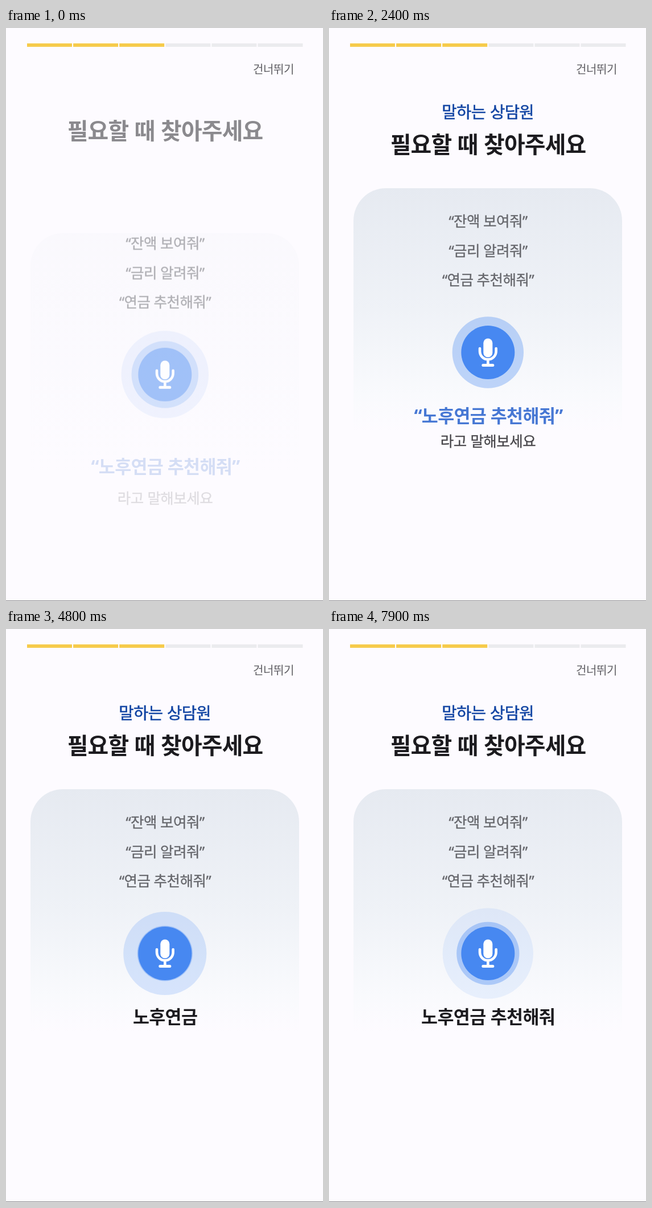
An HTML page that plays this animation: 557 px wide and 1005 px high, repeating every 8000 ms.

```html
<!DOCTYPE html>
<html lang="ko">
<head>
<meta charset="utf-8">
<style>
  html, body { margin: 0; width: 100%; height: 100%; overflow: hidden; background: #fdfbff; }
  svg { display: block; width: 100%; height: 100%; }
  text {
    font-family: "Noto Sans CJK KR", "Noto Sans CJK", sans-serif;
    letter-spacing: -.02em;
    text-anchor: middle;
    color: #1c1b1f;
    fill: currentColor;
  }
  .title { font-size: 39.9px; font-weight: 700; }
  .sub { font-size: 28.6px; font-weight: 500; color: #1245a3; stroke: currentColor; stroke-width: .6px; }
  .skip { font-size: 20px; color: #605f64; }
  .line { font-size: 25.5px; stroke: currentColor; stroke-width: .35px; }
  .phrase { font-size: 31.5px; font-weight: 700; }
  .quoted { font-family: "Noto Sans", "Noto Sans CJK KR", "Noto Sans CJK", sans-serif; }
  #examples text { color: #66676c; }
  .blue { color: #1a57ca; }
</style>
</head>
<body>
<svg viewBox="0 0 557 1005">
  <defs>
    <linearGradient id="fade" x1="0" y1="0" x2="0" y2="1">
      <stop offset="0" stop-color="#e6eaf1"/>
      <stop offset=".5" stop-color="#eff2f7"/>
      <stop offset=".85" stop-color="#f9fafd"/>
      <stop offset="1" stop-color="#fdfbff"/>
    </linearGradient>
  </defs>
  <rect width="557" height="1005" fill="#fdfbff"/>
  <rect y="1004" width="557" height="1" fill="#8b8a8d"/>
  <g id="bars"></g>
  <text class="skip" x="470" y="79.5">건너뛰기</text>

  <text id="sub" class="sub" x="279.2" y="158">말하는 상담원</text>
  <text id="title" class="title" x="279.6" y="219.3">필요할 때 찾아주세요</text>

  <path id="card" d="M43 707V338a57 57 0 0 1 57-57H458a57 57 0 0 1 57 57V707Z" fill="url(#fade)"/>

  <g id="examples">
    <text class="line quoted" x="279.5" y="348">“잔액 보여줘”</text>
    <text class="line quoted" x="279.5" y="399.6">“금리 알려줘”</text>
    <text class="line quoted" x="279.5" y="451.2">“연금 추천해줘”</text>
    <g fill="#4788f1">
      <circle id="ringA" cx="279.3" cy="569"/>
      <circle id="ringB" cx="279.3" cy="569"/>
      <circle cx="279.3" cy="569" r="47"/>
    </g>
    <g fill="none" stroke="#fff" stroke-linecap="round">
      <rect x="271.3" y="544.5" width="16" height="33" rx="8" fill="#fff" stroke="none"/>
      <path d="M265 562v5a14.3 14.3 0 0 0 28.6 0v-5M279.3 582v9" stroke-width="4.6"/>
      <path d="M270.8 591.6h17" stroke-width="5"/>
    </g>
  </g>

  <text id="prompt" class="phrase quoted blue" x="280" y="692">“노후연금 추천해줘”</text>
  <text id="hint" class="line" x="279.5" y="733.8">라고 말해보세요</text>
  <text id="heardPart" class="phrase" x="279.6" y="692">노후연금</text>
  <text id="heardAll" class="phrase" x="279.6" y="692">노후연금 추천해줘</text>
</svg>
<script>
const LOOP = 8000;
const el = id => document.getElementById(id);

for (let i = 0; i < 6; i++) {
  el('bars').insertAdjacentHTML('beforeend',
    `<rect x="${37 + i * 81.1}" y="27" width="79" height="6" fill="${i < 3 ? '#f6cb4b' : '#ebebee'}"/>`);
}

const ramp = (t, from, to) => Math.min(1, Math.max(0, (t - from) / (to - from)));
const easeOut = p => 1 - (1 - p) ** 1.7;
const mix = (a, b, p) => a + (b - a) * p;

function place(id, dy, opacity) {
  el(id).setAttribute('transform', `translate(0 ${dy})`);
  el(id).setAttribute('opacity', opacity);
}

// Ripples grow steadily and fade out over the outer part of their path.
function ripple(id, cycle) {
  const r = 44.5 + 42.5 * (cycle - Math.floor(cycle));
  el(id).setAttribute('r', r);
  el(id).setAttribute('opacity', 0.37 * (1 - ramp(r, 60, 87)));
}

function draw(t) {
  const head = easeOut(ramp(t, 0, 300));
  const body = easeOut(ramp(t, 0, 450));
  const sub = easeOut(ramp(t, 0, 920));
  const settle = ramp(t, 420, 900);
  const leave = 1 - ramp(t, 2300, 2800);
  const swap = ramp(t, 5300, 5600);

  place('title', mix(-24, 0, head), mix(0.5, 1, head));
  place('sub', mix(-24, 0, head) + mix(-50, 0, sub), sub);
  place('card', mix(79, 0, body), mix(0.13, 1, body));
  place('examples', mix(39, 0, head), mix(0.5, 1, head));
  place('prompt', mix(89, 0, body), mix(0.17, 1, body) * leave);
  place('hint', mix(88, 0, body) + mix(13, 0, settle),
    mix(0.13, 0.87, body) * mix(1, 1 / 0.87, settle) * leave);
  place('heardPart', 0, ramp(t, 4000, 4400) * (1 - swap));
  place('heardAll', 0, swap);

  const cycle = 0.335 + t * 0.000695;
  ripple('ringA', cycle);
  ripple('ringB', cycle - 0.576);
}

function tick() {
  draw(performance.now() % LOOP);
  requestAnimationFrame(tick);
}
tick();
</script>
</body>
</html>
```
